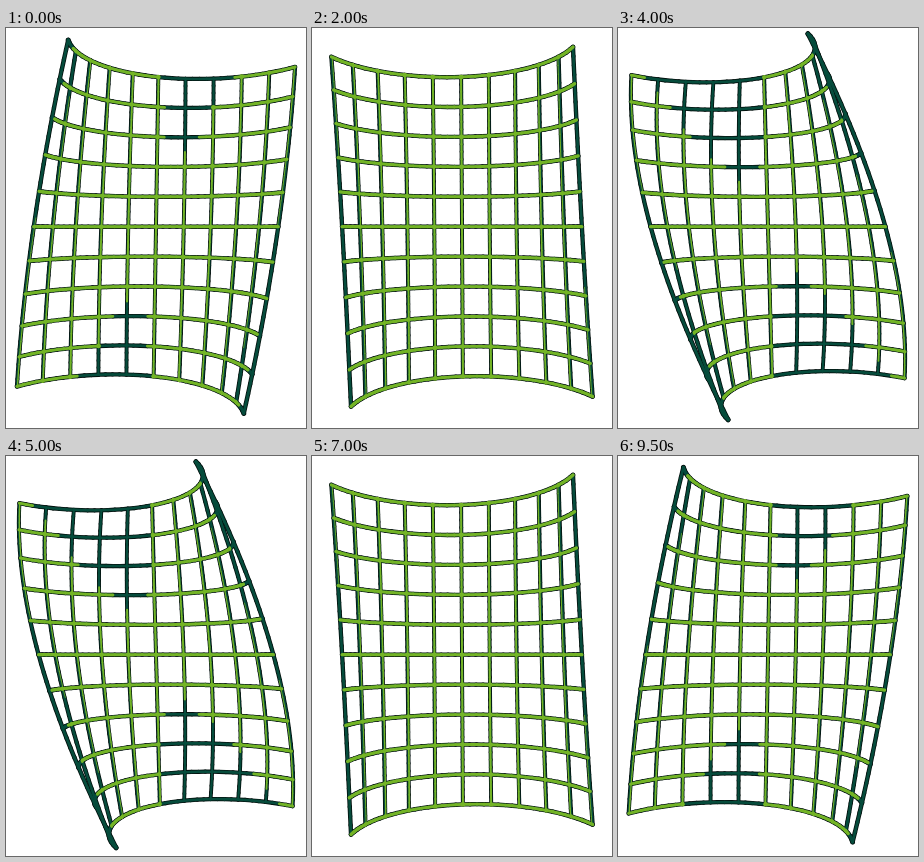
These frames come from a looping animation (300x400 px, 10 s). An HTML page with a canvas:

```html
<!DOCTYPE html>
<html lang="en">
<head>
<meta charset="utf-8">
<title>Twisting lattice</title>
<style>
html, body { margin: 0; width: 100%; height: 100%; overflow: hidden; background: #fff; }
canvas { display: block; width: 300px; height: 400px; }
</style>
</head>
<body>
<canvas id="stage" width="300" height="400"></canvas>
<script>
const ctx = document.getElementById('stage').getContext('2d');
const LOOP = 10000, STEP = 500;
const CELLS = 10, HALF_ARC = 140.5, HALF_HEIGHT = 148, VIEW = 560, AXIS_GAP = 6.5;
const EDGE = '#04120f', DARK = '#064c3c', GREEN = '#74b426';
const rad = deg => deg * Math.PI / 180;

// Curved sheet whose rows turn about a vertical axis just behind it,
// in proportion to v.
function makeSheet(time) {
  const swing = Math.cos(2 * Math.PI * (time - 4500) / LOOP);
  const twist = rad(7.5 + 29.6 * swing);
  const bend = rad(75.2 + 3 * swing);
  const radius = HALF_ARC / bend;
  return (u, v, lift = 0) => {
    const phi = u * bend, turn = v * twist, tilt = phi + turn;
    const px = radius * Math.sin(phi);
    const pz = radius * (1 - Math.cos(phi)) + AXIS_GAP;
    const x = px * Math.cos(turn) - pz * Math.sin(turn) - lift * Math.sin(tilt);
    const z = px * Math.sin(turn) + pz * Math.cos(turn) + lift * Math.cos(tilt);
    const sag = radius * (Math.cos(turn) - Math.cos(tilt));
    const scale = VIEW / (VIEW - z);
    return {
      x: 150 + x * scale * (1 - 0.02 * (1 - v * v)),
      y: 198.7 - v * HALF_HEIGHT * scale,
      scale,
      facing: Math.cos(tilt),
      shaded: sag < -2 || Math.cos(tilt) < 0.1
    };
  };
}

function line(a, b, width, color) {
  ctx.lineWidth = width;
  ctx.strokeStyle = color;
  ctx.beginPath();
  ctx.moveTo(a.x, a.y);
  ctx.lineTo(b.x, b.y);
  ctx.stroke();
}

// Calls fn for each short piece of every bar.
function eachPiece(fn) {
  for (let i = 0; i <= CELLS; i++) {
    const fixed = i / CELLS * 2 - 1;
    for (let k = 0; k < 40; k++) {
      const from = k / 20 - 1, to = (k + 1) / 20 - 1;
      fn([from, fixed], [to, fixed], false);
      fn([fixed, from], [fixed, to], true);
    }
  }
}

function draw(time) {
  const sheet = makeSheet(time);
  ctx.fillStyle = '#fff';
  ctx.fillRect(0, 0, 300, 400);
  ctx.lineCap = 'round';

  const layer = (extra, color) => eachPiece((a, b, upright) => {
    const p = sheet(...a), q = sheet(...b);
    line(p, q, (upright ? 2.2 : 2.6) * p.scale + extra, color);
  });
  layer(1.7, EDGE);
  layer(0, DARK);

  eachPiece((a, b, upright) => {
    const lift = upright ? 0.8 : 0;
    const p = sheet(...a, lift), q = sheet(...b, lift);
    if (p.shaded || q.shaded) return;
    const width = upright ? 2 * p.facing : 2.8;
    if (width > 0.6) line(p, q, width * p.scale, GREEN);
  });

  // Rounded joints
  ctx.fillStyle = GREEN;
  for (let i = 1; i < CELLS; i++) {
    for (let j = 0; j <= CELLS; j++) {
      const p = sheet(i / 5 - 1, j / 5 - 1);
      if (p.shaded) continue;
      ctx.beginPath();
      ctx.ellipse(p.x, p.y, 2.5 * Math.max(0.5, p.facing), 2.3, 0, 0, 7);
      ctx.fill();
    }
  }
}

const start = performance.now();
let shown = -1;
function tick() {
  const elapsed = (performance.now() - start) % LOOP;
  const time = Math.floor(elapsed / STEP) * STEP;
  if (time !== shown) draw(shown = time);
  requestAnimationFrame(tick);
}
tick();
</script>
</body>
</html>
```
